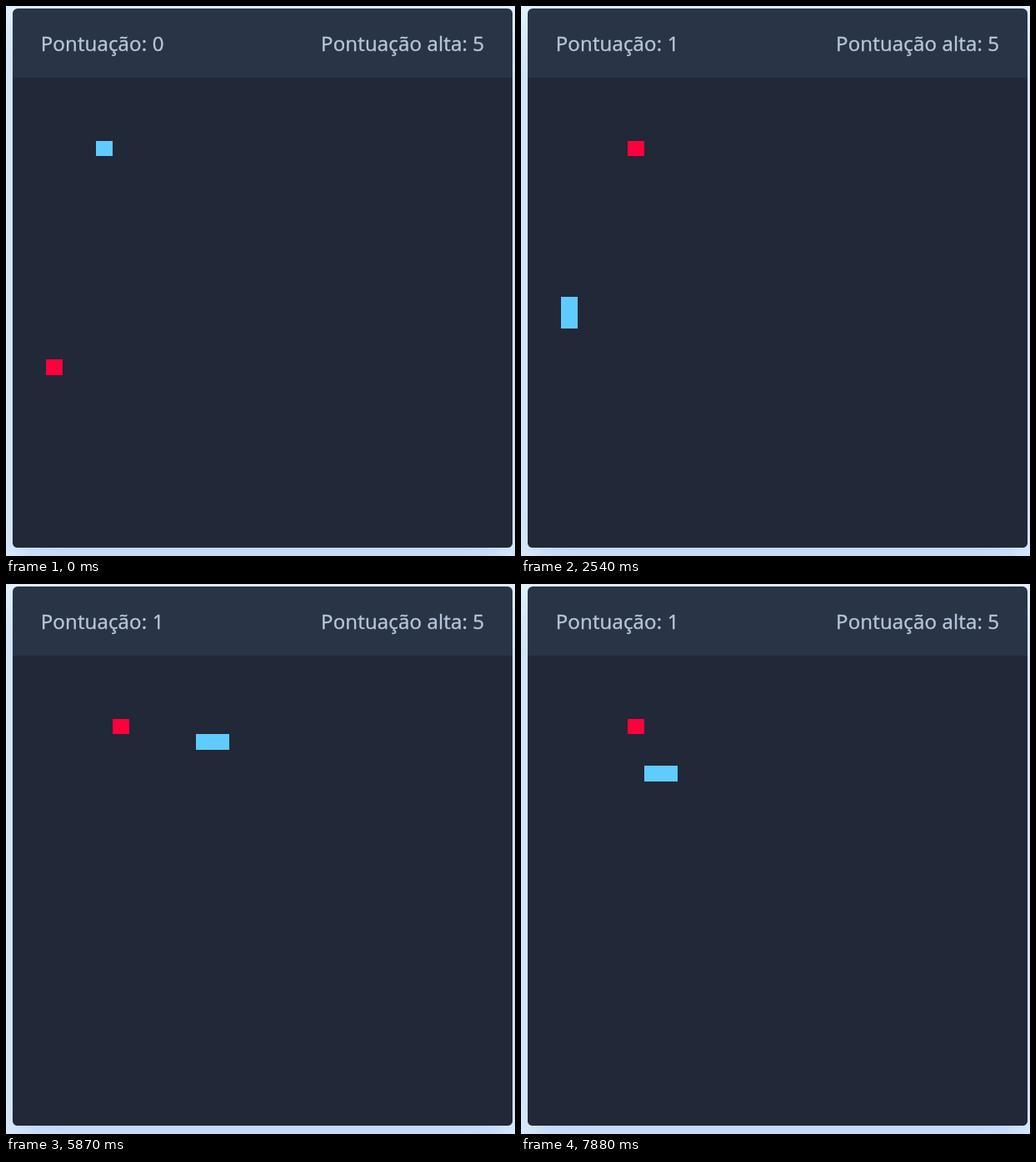
An HTML page with a canvas that plays this animation: 611 by 660 pixels, repeating every 8000 ms.

```html
<!DOCTYPE html>
<html lang="pt">
<head>
<meta charset="utf-8">
<title>Snake</title>
<style>
  html, body { margin: 0; width: 100%; height: 100%; overflow: hidden; }
  body { background: #e3f2fd; position: relative; }
  .card {
    position: absolute; left: 8px; top: 3px; width: 600px; height: 647px;
    border-radius: 6px; overflow: hidden; background: #293447;
    box-shadow: 0 25px 50px rgba(52, 87, 220, .2);
  }
  /* The thin stroke and spacing give regular type a medium weight */
  .scores {
    display: flex; justify-content: space-between; box-sizing: border-box;
    height: 83px; padding: 25px 33.75px; white-space: nowrap;
    font: 500 24px/33px "Open Sans", "Noto Sans", sans-serif; color: #b8c6dc;
    letter-spacing: .17px; -webkit-text-stroke: .4px;
  }
  canvas { display: block; background: #212837; }
</style>
</head>
<body>
<div class="card">
  <div class="scores"><span id="score">Pontuação: 0</span><span>Pontuação alta: 5</span></div>
  <canvas id="board" width="600" height="564"></canvas>
</div>
<script>
const LOOP = 8000;
const REFRESH = 200 / 3; // the screen refreshes three times for every two moves
const ROUTE = 'R1 D15 L4 U7 R6 D5 R6 U12 L9 U4 R3 D6 L1';
const STEP = { R: [1, 0], L: [-1, 0], D: [0, 1], U: [0, -1] };
const FOOD = [[2, 18], [6, 4]];

const path = [[5, 4]];
for (const leg of ROUTE.split(' ')) {
  const [dx, dy] = STEP[leg[0]];
  for (let n = +leg.slice(1); n > 0; n--) {
    const [x, y] = path[path.length - 1];
    path.push([x + dx, y + dy]);
  }
}
// The snake grows one move after its head reaches the food
const eaten = path.findIndex(p => String(p) === String(FOOD[0])) + 1;

const score = document.getElementById('score');
const ctx = document.getElementById('board').getContext('2d');
const rowTop = r => Math.round(86.5 + 18.75 * r) - 86;

function cell([x, y], color) {
  ctx.fillStyle = color;
  ctx.fillRect(20 * x, rowTop(y), 20, rowTop(y + 1) - rowTop(y));
}

function draw() {
  const refreshes = Math.floor(performance.now() % LOOP / REFRESH);
  const move = Math.floor((2 * refreshes + 1) / 3);
  const points = move >= eaten ? 1 : 0;
  const text = 'Pontuação: ' + points;
  if (score.textContent !== text) score.textContent = text;
  ctx.clearRect(0, 0, 600, 564);
  cell(FOOD[points], '#ff003d');
  for (let i = 0; i <= points; i++) cell(path[move - i], '#60cbff');
  requestAnimationFrame(draw);
}
draw();
</script>
</body>
</html>
```
